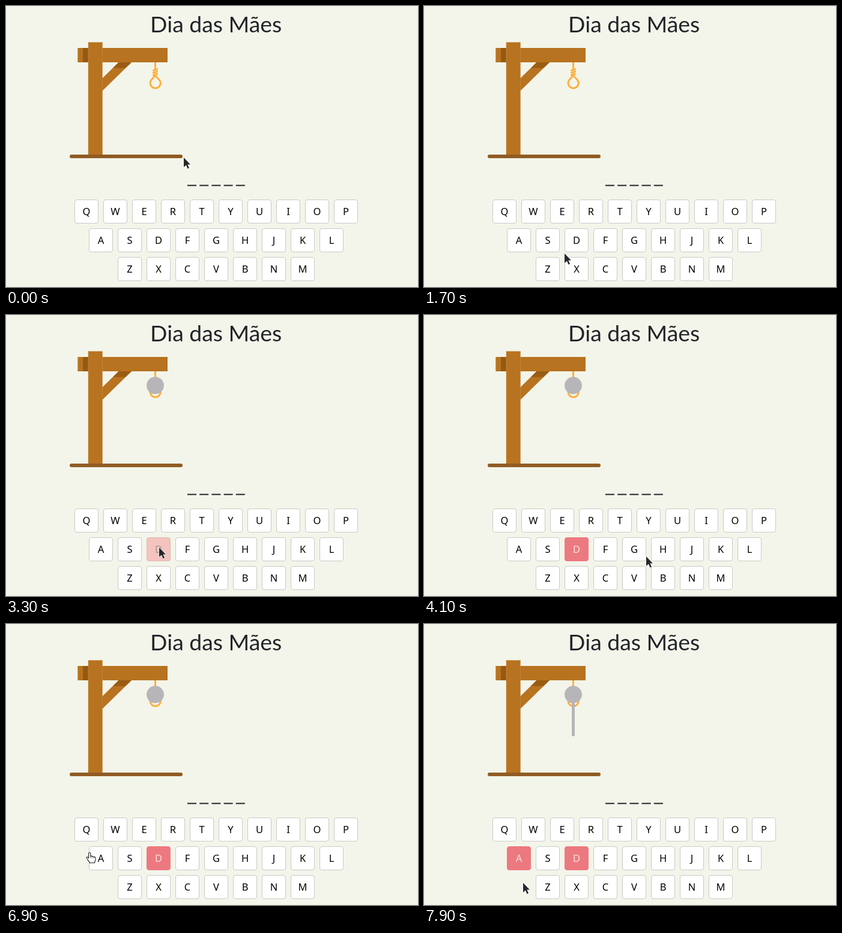
Recreate the animation shown at these times as an HTML page. Size 686 by 469 pixels, loop 8000 ms.

```html
<!DOCTYPE html>
<html lang="pt">
<head>
<meta charset="utf-8">
<title>Forca</title>
<style>
  html, body { margin: 0; width: 100%; height: 100%; overflow: hidden; background: #f3f5ea; }
  svg { display: block; }
  text { text-anchor: middle; fill: #000; font: 500 16.5px "Noto Sans", "Open Sans", sans-serif; }
  .title { fill: #212529; font: 400 37.4px Lato, "Open Sans", sans-serif; }
  .key rect { fill: #fff; stroke: #c9cac6; }
  .fading rect { fill: #f4c3be; stroke: #dfb9b5; }
  .fading text { fill: #a29391; }
  .wrong rect { fill: #ed7980; stroke: #ed7980; }
  .wrong text { fill: #f9dfdc; }
  .rope { fill: none; stroke: #fbb040; stroke-width: 3; stroke-linecap: round; }
</style>
</head>
<body>
<svg id="stage" width="686" height="469" viewBox="0 0 686 469">
  <text class="title" x="349.7" y="44">Dia das Mães</text>

  <g fill="#b87320">
    <path d="M160 121L187.500 94H209L160 142Z"/>
    <path fill="#9a5c12" d="M187.500 94H209L199 103.500H178Z"/>
    <rect x="119.500" y="70" width="149.500" height="24"/>
    <rect fill="#955a12" x="128" y="70" width="9" height="24"/>
    <rect x="137" y="60.500" width="23.500" height="188"/>
    <path d="M137 60.500V248M160.500 60.500V248M119.500 70V94" fill="none" stroke="#c98f4b" stroke-width=".6"/>
  </g>
  <rect x="106" y="248" width="188" height="6" rx="3" fill="#905c24"/>

  <g class="rope">
    <path d="M248.500 94V105" stroke-linecap="butt"/>
    <path d="M248.500 116C245 121 240 123 240 128.500A8.700 8.700 0 0 0 257.400 128.500C257.400 123 252 121 248.500 116Z"/>
    <path d="M245.500 107.500L251.500 105.500M245.500 111.500L251.500 109.500M245.500 115.500L251.500 113.500" stroke-width="3.200"/>
  </g>
  <path id="torso" d="M248.500 128V185" stroke="#b7b5b8" stroke-width="5" stroke-linecap="round"/>
  <circle id="head" cx="248.500" cy="117.700" r="14.400" fill="#b7b5b8"/>

  <path id="blanks" stroke="#212529" stroke-width="2"/>
  <g id="keys"></g>

  <g id="arrow">
    <path d="M0 0V16L3.900 12.500L6.500 18.500L9 17.400L6.400 11.500H11Z"
      fill="#25282b" stroke="#fff" stroke-width="1.200" stroke-linejoin="round" paint-order="stroke"/>
  </g>
  <g id="hand" fill="#fff" stroke="#222" stroke-width="1.100" stroke-linejoin="round">
    <path d="M-1.400 10V1.800Q-1.400 .5 .2 .5T1.800 1.800V6.600Q3.300 5.500 4.700 7Q6.200 6.200 7.500 7.800Q10 7.200 10 9.700V12.500Q10 14.500 8.700 15.800V17.800H.2V16.300Q-2 14.500-3.300 11.800L-4.900 9.500Q-5.200 7.800-3.600 7.800Q-2.400 8-1.400 10Z"/>
    <path d="M1.800 6.600V9.500M4.700 7V9.800M7.500 7.800V10" fill="none" stroke-width=".8"/>
  </g>
</svg>
<script>
const LOOP = 8000;
const $ = id => document.getElementById(id);

const blankX = i => 302 + i * 20.2;
$('blanks').setAttribute('d', [0, 1, 2, 3, 4].map(i => `M${blankX(i)} 299.500h15`).join(''));

const keys = {};
const rows = [['QWERTYUIOP', 114], ['ASDFGHJKL', 138], ['ZXCVBNM', 186]];
rows.forEach(([letters, left], row) => [...letters].forEach((letter, col) => {
  const g = document.createElementNS('http://www.w3.org/2000/svg', 'g');
  const x = left + col * 48, y = 323 + row * 48;
  g.innerHTML = `<rect x="${x + .5}" y="${y + .5}" width="39" height="39" rx="3.500"/>
    <text x="${x + 20}" y="${y + 26}">${letter}</text>`;
  $('keys').append(g);
  keys[letter] = g;
}));

// [time, pointer x, pointer y, pointer kind]
const A = 'arrow', H = 'hand';
const steps = [
  [0, 296, 253, A], [700, 282, 278, A],
  [900, 276, 292, A], [1000, 265, 315, A], [1100, 252, 340, H], [1200, 243, 360, H], [1300, 238, 371, H],
  [1500, 230, 382, A], [1600, 227, 402, A], [1700, 234, 413, A], [1800, 245, 413, A], [1900, 258, 411, A],
  [2000, 270, 406, H], [2100, 276, 399, A], [2200, 269, 392, H], [2300, 260, 389, H], [2500, 255, 388, H],
  [3300, 255, 388, A], [3800, 268, 389, A], [3900, 304, 397, H], [4000, 348, 403, H], [4100, 370, 403, A],
  [5700, 370, 402, H], [5800, 280, 388, A], [6000, 263, 383, A], [6100, 250, 382, A],
  [6600, 228, 383, A], [6700, 181, 383, A], [6800, 150, 382, H], [6900, 139, 381, H], [7200, 160, 387, H],
  [7400, 160, 387, A], [7600, 161, 391, A], [7700, 163, 403, A], [7800, 164, 420, A], [7900, 165, 432, A]
];
const misses = [['D', 3300, 'head'], ['A', 7400, 'torso']];

const show = (el, on) => el.setAttribute('visibility', on ? 'visible' : 'hidden');

function draw(now) {
  const t = now % LOOP;
  const [, x, y, kind] = steps.findLast(s => s[0] <= t);
  for (const id of [A, H]) {
    show($(id), id === kind);
    $(id).setAttribute('transform', `translate(${x} ${y})`);
  }
  for (const letter in keys) keys[letter].setAttribute('class', 'key');
  for (const [letter, at, part] of misses) {
    show($(part), t >= at);
    if (t >= at) keys[letter].classList.add(t < at + 100 ? 'fading' : 'wrong');
  }
}

const start = performance.now();
function tick() {
  draw(performance.now() - start);
  requestAnimationFrame(tick);
}
tick();
</script>
</body>
</html>
```
